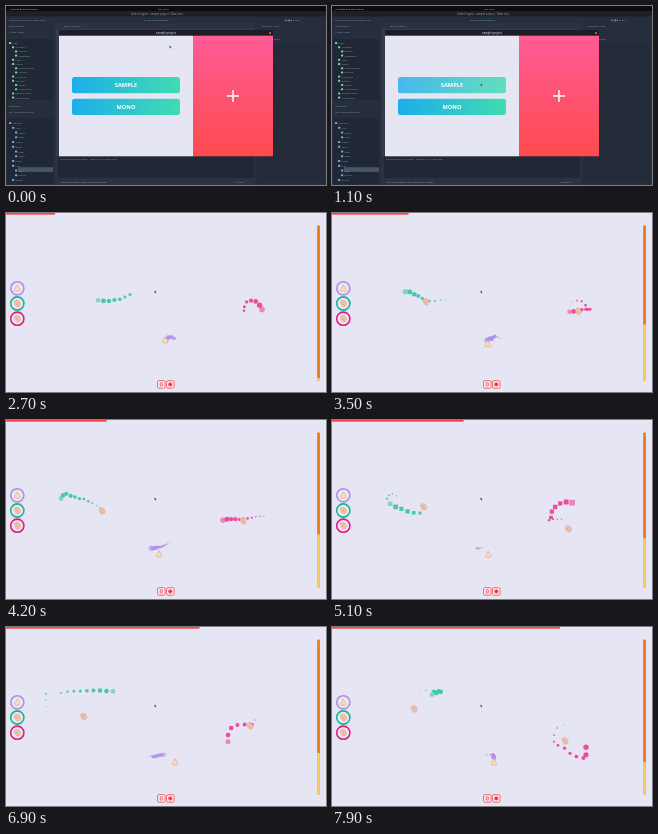
An HTML page that plays this animation: 320 by 179 pixels, repeating every 8 s.

```html
<!DOCTYPE html>
<html lang="en">
<head>
<meta charset="utf-8">
<title>Sound game</title>
<style>
html, body { margin: 0; width: 100%; height: 100%; overflow: hidden; background: #262e3d; }
svg { display: block; width: 100%; height: 100%; }
text { font-family: "Open Sans", "Noto Sans", sans-serif; }
</style>
</head>
<body>
<svg id="stage" viewBox="0 0 320 179" preserveAspectRatio="none">
  <defs>
    <linearGradient id="btn"><stop offset="0" stop-color="#1caeea"/><stop offset="1" stop-color="#40dcb2"/></linearGradient>
    <linearGradient id="side" x2="0" y2="1"><stop offset="0" stop-color="#ff5c97"/><stop offset="1" stop-color="#ff4a4e"/></linearGradient>
    <g id="nose">
      <path d="M0-3.4C.8-1 2.8.6 2.8 2Q2.4 3.5 0 2.8Q-2.4 3.5-2.8 2C-2.8.6-.8-1 0-3.4Z" fill="#f3dcd0" stroke="#eeb07c" stroke-width=".8"/>
    </g>
    <g id="fist">
      <path d="M-3-1.6Q-2.4-3.4-.6-3.2Q2.2-3.4 2.9-.6Q3.6 1.8 1.8 3Q-.6 3.8-1.8 1.8Z" fill="#f3c8b4" stroke="#d9a084" stroke-width=".6"/>
      <path d="M-1.8-1.2L.2.4M-.3-2L1.4-.2M-1 1.2Q.6.4 1.4 1.6" fill="none" stroke="#cf8f70" stroke-width=".5"/>
    </g>
  </defs>

  <g id="editor">
    <rect width="320" height="179" fill="#262e3d"/>
    <rect width="320" height="5" fill="#0b0c0f"/>
    <rect y="5" width="320" height="5.5" fill="#1d2027"/>
    <rect x="49" y="17.5" width="200" height="161.5" fill="#2b3343"/>
    <rect x="50" y="23" width="198" height="127" fill="#343c4b"/>
    <rect x="52" y="150" width="196" height="22" fill="#202735"/>
    <rect x="1" y="33" width="46" height="61" fill="#202735"/>
    <rect x="1" y="112" width="46" height="66" fill="#202735"/>
    <rect x="12" y="161.3" width="35" height="4.6" fill="#4a5568"/>
    <rect x="251" y="37" width="68" height="139" fill="#232b39"/>
    <g id="labels"></g>
  </g>

  <g id="wallpaper">
    <rect width="320" height="5" fill="#58c4c8"/>
    <path d="M84 0H96L84 5H70ZM285 0H320V3L276 5Z" fill="#e3f2f1"/>
  </g>

  <g id="menu">
    <rect x="53" y="24" width="214" height="6" fill="#1c1e23"/>
    <text x="160" y="28.2" font-size="2.7" font-weight="700" text-anchor="middle" fill="#a9acb2">sample project</text>
    <circle cx="264" cy="27" r="1.1" fill="#e2653f"/>
    <rect x="53" y="29.7" width="134" height="120.6" fill="#e6e5f3"/>
    <rect x="187" y="29.7" width="80" height="120.6" fill="url(#side)"/>
    <path d="M227 84V96M221 90H233" stroke="#fff" stroke-width="1.5"/>
    <rect id="pick" x="66" y="71" width="108" height="16.3" rx="2.5" fill="url(#btn)"/>
    <rect x="66" y="92.8" width="108" height="16.3" rx="2.5" fill="url(#btn)"/>
    <g font-size="5.7" font-weight="700" text-anchor="middle" fill="#fff">
      <text x="120" y="81.2">SAMPLE</text>
      <text x="120" y="103">MONO</text>
    </g>
  </g>

  <g id="game">
    <rect width="320" height="179" fill="#e6e5f3"/>
    <rect id="progress" width="0" height="1.7" fill="#ff4147"/>
    <rect x="311.6" y="13" width="2" height="154.3" fill="#fbd167" stroke="#f4b133" stroke-width=".6"/>
    <rect id="level" x="311.3" y="12.7" width="2.6" height="0" fill="#ec7a18"/>
    <path id="rough" d="M312.6 13V167" stroke="#f8b92c" stroke-width="1.4" stroke-dasharray="1 1.6"/>
    <g id="rings"></g>
    <g fill="#f8e3ea" stroke="#ec5560" stroke-width=".8">
      <rect x="151.5" y="167.6" width="7.6" height="7.6" rx="1.5"/>
      <rect x="160.5" y="167.6" width="7.6" height="7.6" rx="1.5"/>
      <rect x="154.3" y="169.7" width="2" height="3.4" rx=".5"/>
      <circle cx="164.3" cy="171.4" r="1.7" fill="#ea3340"/>
    </g>
    <g id="drops"></g>
    <g id="actors"></g>
  </g>

  <path id="cursor" d="M0 0V2.6L.7 2L1.3 3.1L1.8 2.8L1.3 1.8H2.1Z" fill="#111" stroke="#fff" stroke-width=".2"/>
</svg>
<script>
const LOOP = 8000, STEP = 100;
const OPEN = 1200, OPEN_TIME = 280, PLAY = 1275;
const LIFE = 1750, BEAT = 125;
const TEAL = "#36c6a2", PINK = "#ee3b92", VIOLET = "#ad90f2";
const el = id => document.getElementById(id);
const make = tag => document.createElementNS("http://www.w3.org/2000/svg", tag);
const show = (node, on) => node.setAttribute("display", on ? "inline" : "none");

function set(node, attrs) {
  for (const k in attrs) node.setAttribute(k, attrs[k]);
  return node;
}
const add = (parent, tag, attrs) => parent.appendChild(set(make(tag), attrs));

let seed = 7;
function random() {
  seed = (seed * 16807) % 2147483647;
  return seed / 2147483647;
}

// Linear interpolation over [time, ...values] keys
function along(keys, t) {
  const i = keys.findIndex(k => t <= k[0]);
  if (i === 0) return keys[0].slice(1);
  if (i < 0) return keys[keys.length - 1].slice(1);
  const a = keys[i - 1], b = keys[i], u = (t - a[0]) / (b[0] - a[0]);
  return a.slice(1).map((v, j) => v + (b[j + 1] - v) * u);
}

// Editor labels
function label(x, y, text, size = 2.4, fill = "#929bab") {
  add(el("labels"), "text", { x, y, "font-size": size, fill }).textContent = text;
}

function tree(names, top, gap, fill) {
  names.split(" ").forEach((name, i) => {
    const x = 3 + (i ? 3 : 0) + (i % 4 > 1 ? 3 : 0), y = top + i * gap;
    add(el("labels"), "rect", { x, y: y - 2, width: 2.2, height: 2, rx: .6, fill });
    label(x + 3.5, y, name);
  });
}

label(3, 3.6, "Activities   ● Godot Engine", 2.5, "#d8dade");
label(152, 3.6, "Sat 15:42", 2.5, "#d8dade");
label(125, 8.8, "Godot Engine - sample project - Main.tscn", 2.7);
label(3, 15.2, "Scene  Project  Debug  Editor  Help");
label(138, 15.2, "2D    3D    Script    AssetLib", 2.5, "#82b6e8");
label(279, 15.2, "▶   ▮▮   ■   GLES2");
label(3, 21, "Scene   Import");
label(58, 21, "Main   ×   Menu   +");
label(256, 21, "Inspector   Node");
label(3, 27, "+   Filter nodes");
label(3, 101, "FileSystem");
label(3, 107, "res://scenes/Main.tscn");
label(54, 154, "Godot Engine v3.2.stable - OpenGL ES 2.0 Renderer");
label(54, 177, "Output   Debugger   Audio   Animation   Shader");
label(228, 177, "3.2.stable");
label(256, 34, "Filter properties");
tree("Main UserRect Overlay MarginBox Label Label2 MenuControls Camera PanelCont Register Import AudioPlayer RegisterTimer ImportTimer", 38, 4.2, "#75d69a");
tree("Favorites res:// assets fonts scenes audio Main Menu Player Play Trail Button Theme", 118, 4.75, "#76a7d8");

["#ae8fe8", "#1cb691", "#e01d80"].forEach((stroke, i) => {
  const y = 75.3 + 15.2 * i;
  add(el("rings"), "circle", { cx: 11.3, cy: y, r: 6.6, fill: "#ebe6ee", stroke, "stroke-width": 1.6 });
  add(el("rings"), "use", { href: i ? "#fist" : "#nose", x: 11.3, y });
});

// Each stroke leaves a mark per beat along its curve; marks then shrink away
const marks = [];
function stroke(fill, from, to, d, square) {
  const curve = set(make("path"), { d });
  const count = Math.round((to - from) / BEAT);
  for (let i = 0; i <= count; i++) {
    const p = curve.getPointAtLength(curve.getTotalLength() * i / count);
    marks.push({
      birth: from + (to - from) * i / count,
      x: p.x, y: p.y + random() - .5,
      size: 2.3 + .7 * random(),
      round: square ? .2 : 1,
      node: add(el("drops"), "rect", { fill })
    });
  }
}

stroke(TEAL, 1850, 2640, "M124 82Q108 90 92 87");
stroke(TEAL, 2850, 4100, "M94 88Q84 80 72 78L58 73L55 79");
stroke(TEAL, 4400, 5700, "M88 93Q70 92 56 82.5L40 80V67", true);
stroke(TEAL, 5800, 6850, "M55 66Q72 62 107 64");
stroke(TEAL, 7300, 7800, "M102 64H110L100 68");
stroke(PINK, 1900, 2640, "M238 98V94L241 88Q252 86 256 96");
stroke(PINK, 2800, 4080, "M258 96Q240 99 217 100");
stroke(PINK, 4450, 5700, "M219 98L220 91Q226 81 238 82.5Q248 85 252 91L246 96L238 98", true);
stroke(PINK, 6200, 6850, "M246 97H236Q220 98 222 115");
stroke(PINK, 7050, 7750, "M226 118L234 122L240 128L254 132V120");
stroke(VIOLET, 2250, 2640, "M168 125Q164 122 160 126.5");
stroke(VIOLET, 2800, 4080, "M163 123Q154 128 145 128.5");
stroke(VIOLET, 5350, 5650, "M140 129.5L148.5 128", true);
stroke(VIOLET, 6250, 6800, "M147 129.5L158 128");
stroke(VIOLET, 7350, 7750, "M161 128L162 131");

function drawMark({ birth, x, y, size, round, node }, t) {
  const age = t - birth, on = age >= 0 && age < LIFE;
  show(node, on);
  if (!on) return;
  const r = size * (1 - age / LIFE);
  set(node, { x: x - r, y: y - r, width: 2 * r, height: 2 * r, rx: r * round, opacity: age < BEAT ? .55 : .9 });
}

const actor = (shape, ...path) => ({ path, node: add(el("actors"), "use", { href: shape }) });
const actors = [
  actor("#nose", [PLAY,100,78], [2700,159,127], [4200,153,134], [6000,159.5,135], [6900,169,135], [7900,162,135]),
  actor("#fist", [2900,92,87], [4200,96,91], [6000,87,83], [6900,77.5,89.5], [7900,82,82]),
  actor("#fist", [2900,254,96], [4200,237,101], [6000,235.5,117], [6900,244,99], [7900,233,114])
];

const levelKeys = [[1300,167.5], [2700,165], [3400,111], [6900,126], [7900,135]];
const cursorKeys = [[100,163.5,39.5], [600,148.5,77.5]];

function draw(now) {
  const t = Math.floor(now % LOOP / STEP) * STEP;
  const playing = t > PLAY;
  show(el("menu"), !playing);
  show(el("game"), playing);
  show(el("wallpaper"), t >= OPEN);
  set(el("pick"), { opacity: t >= 800 ? .8 : 1 });

  const [cx, cy] = along(cursorKeys, t);
  set(el("cursor"), { transform: `translate(${cx} ${cy})` });
  if (!playing) return;

  // The window grows from its small frame to the whole stage
  const rest = Math.max(0, 1 - (t - OPEN) / OPEN_TIME) ** 3;
  const x = 55 * rest, y = 27 * rest;
  set(el("game"), { transform: `translate(${x} ${y}) scale(${1 - 2 * x / 320} ${1 - 2 * y / 179})` });

  set(el("progress"), { width: (t - PLAY) * .0344 });
  set(el("level"), { height: along(levelKeys, t)[0] - 12.7 });
  show(el("rough"), t < 1700);
  marks.forEach(m => drawMark(m, t));
  for (const { path, node } of actors) {
    const [ax, ay] = along(path, t);
    show(node, t >= path[0][0]);
    set(node, { x: ax, y: ay });
  }
}

const begin = performance.now();
function tick() {
  draw(performance.now() - begin);
  requestAnimationFrame(tick);
}
tick();
</script>
</body>
</html>
```
